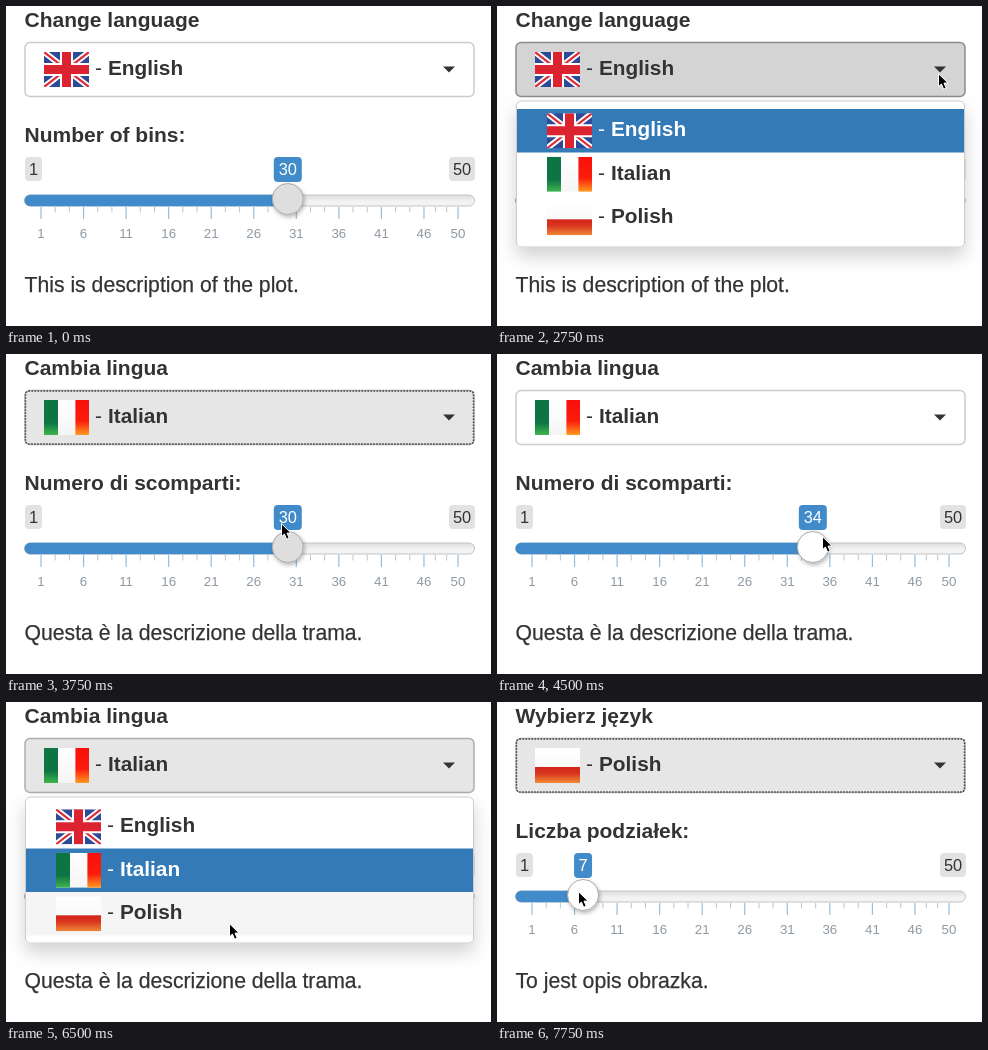
Recreate the animation shown at these times as an HTML page. Size 485x320 px, loop 8 s.

```html
<!DOCTYPE html>
<html lang="en">
<head>
<meta charset="utf-8">
<title>Language switcher</title>
<style>
html, body { margin: 0; width: 100%; height: 100%; overflow: hidden; background: #fff; }
svg { display: block; }
text { font: 21px "Liberation Sans", Arial, sans-serif; fill: #333; }
.b { font-weight: bold; }
.w { fill: #fff; }
.name { font-size: 20.8px; }
.note { font-size: 21.2px; stroke: #333; stroke-width: .25px; }
.tag { font-size: 16.4px; text-anchor: middle; }
.tick { font-size: 13.3px; text-anchor: middle; fill: #8e99a3; }
</style>
</head>
<body>
<svg width="485" height="320" viewBox="0 0 485 320">
  <defs>
    <linearGradient id="track" x2="0" y2="1"><stop stop-color="#ddd"/><stop offset=".6" stop-color="#f3f3f3"/></linearGradient>
    <linearGradient id="green" x2="0" y2="1"><stop stop-color="#0d7543"/><stop offset=".65" stop-color="#0d7543"/><stop offset="1" stop-color="#3fb54e"/></linearGradient>
    <linearGradient id="red" x2="0" y2="1"><stop stop-color="#f90f0c"/><stop offset=".6" stop-color="#fb1c0c"/><stop offset="1" stop-color="#ff9a20"/></linearGradient>
    <linearGradient id="rust" x2="0" y2="1"><stop stop-color="#d3261c"/><stop offset=".4" stop-color="#d9351f"/><stop offset="1" stop-color="#f08a35"/></linearGradient>
    <linearGradient id="pale" x2="0" y2="1"><stop stop-color="#fff"/><stop offset="1" stop-color="#f6f5f5"/></linearGradient>
    <filter id="drop" x="-20%" y="-20%" width="140%" height="150%"><feDropShadow dx="0" dy="9" stdDeviation="9" flood-opacity=".18"/></filter>
    <filter id="lift" x="-50%" y="-50%" width="200%" height="200%"><feDropShadow dx="1" dy="2" stdDeviation="2" flood-opacity=".3"/></filter>
  </defs>
  <g id="stage"></g>
</svg>
<script>
const LOOP = 8000, STEP = 250;
const langs = [
  { name: 'English', title: 'Change language', bins: 'Number of bins:', note: 'This is description of the plot.' },
  { name: 'Italian', title: 'Cambia lingua', bins: 'Numero di scomparti:', note: 'Questa è la descrizione della trama.' },
  { name: 'Polish', title: 'Wybierz język', bins: 'Liczba podziałek:', note: 'To jest opis obrazka.' }
];
const buttonLook = {
  idle: ['#fff', '#ccc'],
  hover: ['#e6e6e6', '#adadad'],
  pressed: ['#d4d4d4', '#8c8c8c']
};

// Each entry changes part of the state from its time on.
const start = { lang: 0, value: 30, button: 'idle', open: false, focus: false, hot: false, row: -1, cursor: null };
const changes = [
  [750, { cursor: [315, 182] }],
  [1000, { cursor: [340, 158] }],
  [1250, { cursor: [384, 118] }],
  [1500, { cursor: [428, 80] }],
  [1750, { cursor: [442, 67] }],
  [2250, { button: 'hover' }],
  [2750, { button: 'pressed', open: true, cursor: [441, 68] }],
  [3000, { cursor: [428, 72] }],
  [3250, { button: 'hover', cursor: [350, 122] }],
  [3500, { row: 1, cursor: [281, 166] }],
  [3750, { lang: 1, open: false, row: -1, focus: true, cursor: [275, 170] }],
  [4000, { hot: true, cursor: [286, 181] }],
  [4250, { button: 'idle', focus: false, cursor: [291, 183] }],
  [4500, { value: 34, cursor: [325, 183] }],
  [4750, { value: 20, cursor: [206, 183] }],
  [5000, { value: 7, cursor: [95, 183] }],
  [5500, { hot: false, cursor: [291, 89] }],
  [5750, { button: 'hover', cursor: [321, 68] }],
  [6000, { button: 'pressed', open: true, cursor: [318, 70] }],
  [6250, { button: 'hover', cursor: [256, 160] }],
  [6500, { row: 2, cursor: [223, 222] }],
  [6750, { lang: 2, open: false, row: -1, focus: true, cursor: [221, 220] }],
  [7000, { cursor: [196, 213] }],
  [7250, { cursor: [150, 201] }],
  [7500, { cursor: [108, 193] }],
  [7750, { hot: true, cursor: [81, 190] }]
];

const rect = (x, y, w, h, fill, more = '') =>
  `<rect x="${x}" y="${y}" width="${w}" height="${h}" fill="${fill}" ${more}/>`;
const text = (x, y, s, cls = '') => `<text x="${x}" y="${y}" class="${cls}">${s}</text>`;
const path = (d, stroke, width) => `<path d="${d}" fill="none" stroke="${stroke}" stroke-width="${width}"/>`;
const valueX = v => 35 + (v - 1) * 417 / 49;

const cross = 'M22.5 0V35M0 17.5H45', saltire = 'M0 0L45 35M45 0L0 35';
const flags = [
  rect(0, 0, 45, 35, '#2c4a96') + path(saltire, '#fff', 6) + path(saltire, '#dc3038', 2.2) +
    path(cross, '#fff', 13) + path(cross, '#dc2430', 9),
  rect(0, 0, 45, 35, 'url(#pale)') + rect(0, 0, 14, 35, 'url(#green)') + rect(31.4, 0, 13.6, 35, 'url(#red)'),
  rect(0, 0, 45, 35, 'url(#pale)') + rect(0, 19, 45, 16, 'url(#rust)')
];

function option(i, x, y, cls = '') {
  return `<svg x="${x}" y="${y}" width="45" height="35">${flags[i]}</svg>` +
    text(x + 51, y + 23, '-', cls) + text(x + 64, y + 23, langs[i].name, 'b name ' + cls);
}

function button({ lang, button, focus }) {
  const [fill, border] = buttonLook[button];
  return rect(19, 36.5, 449, 54, fill, `rx="5" stroke="${border}" stroke-width="1.5"`) +
    (focus ? rect(19.5, 37, 448, 53, 'none', 'rx="3" stroke="#444" stroke-width="1.5" stroke-dasharray="1.5 1.5"') : '') +
    option(lang, 38, 46) + '<path d="M437 60.5h12l-6 6z" fill="#333"/>';
}

function tag(x, w, h, s, fill, cls) {
  return rect(x - w / 2, 151, w, h, fill, 'rx="4"') + text(x, 168.5, s, 'tag ' + cls);
}

function scale() {
  const marks = [1, 6, 11, 16, 21, 26, 31, 36, 41, 46, 50];
  return marks.map((v, i) => {
    const x = valueX(v), gap = i < 10 ? (valueX(marks[i + 1]) - x) / 3 : 0;
    const minor = gap ? path(`M${x + gap} 201v5.5M${x + 2 * gap} 201v5.5`, '#b9c6cf', 1) : '';
    return path(`M${x} 201v12`, '#93bfe0', 1.2) + minor + text(x, 232, v, 'tick');
  }).join('');
}

function slider({ value, hot }) {
  const x = valueX(value);
  return scale() +
    rect(18.5, 189, 450, 11, 'url(#track)', 'rx="5.5" stroke="#c4c4c4"') +
    `<path d="M${x} 188.7H24.3a5.8 5.8 0 0 0 0 11.6H${x}z" fill="#428bca"/>` +
    tag(27.5, 17, 24, 1, '#e2e2e2', '') + tag(456, 26, 24, 50, '#e2e2e2', '') +
    tag(x, value > 9 ? 28 : 18, 25, value, '#428bca', 'w') +
    `<circle cx="${x}" cy="193" r="15.5" fill="${hot ? '#fff' : '#dedede'}" stroke="#aaa" filter="url(#lift)"/>`;
}

function menu({ lang, row }) {
  const rows = langs.map((_, i) => {
    const y = 103 + 43.5 * i, on = i === lang, hover = i === row;
    const fill = on ? '#337ab7' : hover ? '#f5f5f5' : 'none';
    return rect(20, y, 447, 43.5, fill) + option(i, 50, y + 4.3, on ? 'w' : '');
  });
  return rect(19.5, 95, 448, 146, '#fff', 'rx="5" stroke="#ccc" filter="url(#drop)"') + rows.join('');
}

const pointer = ([x, y]) => `<path transform="translate(${x} ${y - .8})" fill="#000" stroke="#fff"
  d="M.5 .5V13.5L3.4 10.8L5.7 16L8.2 15L6 9.9H10z"/>`;

function draw(s) {
  const { title, bins, note } = langs[s.lang];
  return text(18.5, 21, title, 'b') + text(18.5, 136, bins, 'b') + text(18.5, 286, note, 'note') +
    slider(s) + button(s) + (s.open ? menu(s) : '') + (s.cursor ? pointer(s.cursor) : '');
}

const stage = document.getElementById('stage');
let shown = -1;
function frame() {
  const step = Math.floor(performance.now() % LOOP / STEP);
  if (step !== shown) {
    shown = step;
    const past = changes.filter(([t]) => t <= step * STEP).map(c => c[1]);
    stage.innerHTML = draw(Object.assign({}, start, ...past));
  }
  requestAnimationFrame(frame);
}
frame();
</script>
</body>
</html>
```
